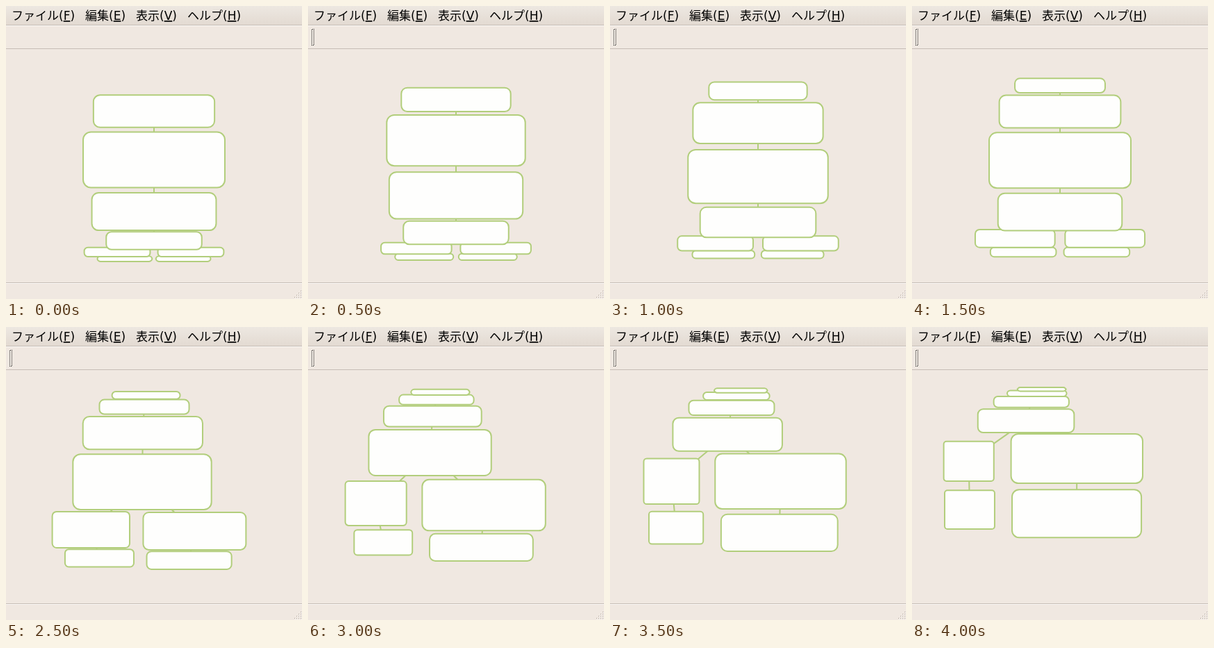
An HTML page for the animation above (4.5 s loop, 426x422 px).

```html
<!DOCTYPE html>
<html lang="ja">
<head>
<meta charset="utf-8">
<style>
  html, body { margin: 0; width: 100%; height: 100%; overflow: hidden; background: #f0e8e1; }
  svg { display: block; }
  text { font: 17px "DejaVu Sans", "Noto Sans CJK JP", "Noto Sans CJK", sans-serif; }
  tspan { text-decoration: underline; }
  #tree path { stroke: #b2ce7c; stroke-width: 2; fill: #fefefd; }
</style>
</head>
<body>
<svg width="426" height="422" viewBox="0 0 426 422">
  <defs>
    <linearGradient id="bar" x2="0" y2="1">
      <stop stop-color="#ede8e1"/><stop offset="1" stop-color="#e3dad2"/>
    </linearGradient>
  </defs>
  <rect width="426" height="422" fill="#f0e8e1"/>
  <rect width="426" height="27" fill="url(#bar)"/>
  <path d="M0 27.5H426M0 61.5H426M0 398.5H426" stroke="#c6bdb5"/>
  <path d="M0 28.5H426M0 399.5H426" stroke="#fbf8f5"/>
  <text x="8" y="20">ファイル(<tspan>F</tspan>)</text>
  <text x="114" y="20">編集(<tspan>E</tspan>)</text>
  <text x="187" y="20">表示(<tspan>V</tspan>)</text>
  <text x="261" y="20">ヘルプ(<tspan>H</tspan>)</text>
  <path id="gripLight" fill="#fff"/>
  <path id="grip" fill="#a89f97"/>
  <path id="focus" fill="#222"/>
  <g id="tree"></g>
</svg>
<script>
const STEP = 500, STEPS = 9;
const CENTER_X = 213, CENTER_Y = 221.5, SIDE = 78.5;
const $ = id => document.getElementById(id);

// A chain of four nodes that forks into two branches of two.
const nodes = [
  { level: 3, side: 0 }, { level: 2, side: 0 }, { level: 1, side: 0 }, { level: 0, side: 0 },
  { level: -.96, side: -1 }, { level: -.96, side: 1 },
  { level: -1.96, side: -1 }, { level: -1.96, side: 1 }
];
const links = [[0, 1], [1, 2], [2, 3], [3, 4], [3, 5], [4, 6], [5, 7]];

// Path of the view: step, levels travelled, pan towards the right branch.
const path = [[0, 0, 0], [2, .71, 0], [3, .99, 0], [5, 1.98, 17], [6, 2.53, 38], [8, 3.37, 54]];

function viewAt(step) {
  const i = Math.max(1, path.findIndex(([s]) => s >= step));
  const [s0, travel0, pan0] = path[i - 1], [s1, travel1, pan1] = path[i];
  const u = (step - s0) / (s1 - s0);
  return { travel: travel0 + (travel1 - travel0) * u, pan: pan0 + (pan1 - pan0) * u };
}

// Fisheye lens: boxes shrink and crowd together away from the focus.
const above = { pull: 80.1, bend: .31, flatten: .72, power: 2, narrow: .37 };
const below = { pull: 84, bend: .27, flatten: .48, power: 2.15, narrow: .3 };

function project({ level, side }, { travel, pan }) {
  const rise = level + travel - 2, d = Math.abs(rise);
  const lens = rise > 0 ? above : below;
  const offset = side * SIDE - pan, u = Math.abs(offset) / SIDE;
  const across = Math.max(u ** 2, u ** 3.7);
  const x = CENTER_X + offset / (1 + .055 * d * d);
  const y = CENTER_Y - lens.pull * rise / Math.sqrt(1 + lens.bend * d * d) / (1 + .02 * across);
  const w = 204 / Math.sqrt(1 + lens.narrow * d * d + across);
  const h = 80 / (1 + lens.flatten * d ** lens.power + .04 * across);
  return { x, y, w, h };
}

function roundedBox({ x, y, w, h }) {
  const l = x - w / 2, r = x + w / 2, t = y - h / 2, b = y + h / 2;
  const c = w * .055, arc = `A${c} ${c} 0 0 1 `;
  return `M${l + c} ${t}H${r - c}${arc}${r} ${t + c}V${b - c}${arc}${r - c} ${b}` +
    `H${l + c}${arc}${l} ${b - c}V${t + c}${arc}${l + c} ${t}Z`;
}

function treeMarkup(step) {
  const view = viewAt(step);
  const boxes = nodes.map(node => project(node, view));
  const lines = links.map(([a, b]) => `M${boxes[a].x} ${boxes[a].y}L${boxes[b].x} ${boxes[b].y}`);
  // Parents lie on top of their children.
  return [lines.join(""), ...boxes.reverse().map(roundedBox)]
    .map(d => `<path d="${d}"/>`).join("");
}

const pixel = (x, y) => `M${x} ${y}h1v1h-1z`;

function gripDots(shift) {
  let d = "";
  for (let row = 0; row < 4; row++)
    for (let col = 0; col <= row; col++) d += pixel(424 - 3 * col + shift, 410 + 3 * row + shift);
  return d;
}

function dottedFrame(left, top, right, bottom) {
  let d = "";
  for (let y = top; y <= bottom; y++)
    for (let x = left; x <= right; x++) {
      const edge = x === left || x === right || y === top || y === bottom;
      if (edge && (x + y) % 2) d += pixel(x, y);
    }
  return d;
}

$("gripLight").setAttribute("d", gripDots(1));
$("grip").setAttribute("d", gripDots(0));
$("focus").setAttribute("d", dottedFrame(5, 33, 8, 56));

let shown = -1;
function draw() {
  const step = Math.floor(performance.now() / STEP) % STEPS;
  if (step !== shown) {
    shown = step;
    $("tree").innerHTML = treeMarkup(step);
    $("focus").style.display = step ? "" : "none";
  }
  requestAnimationFrame(draw);
}
draw();
</script>
</body>
</html>
```
